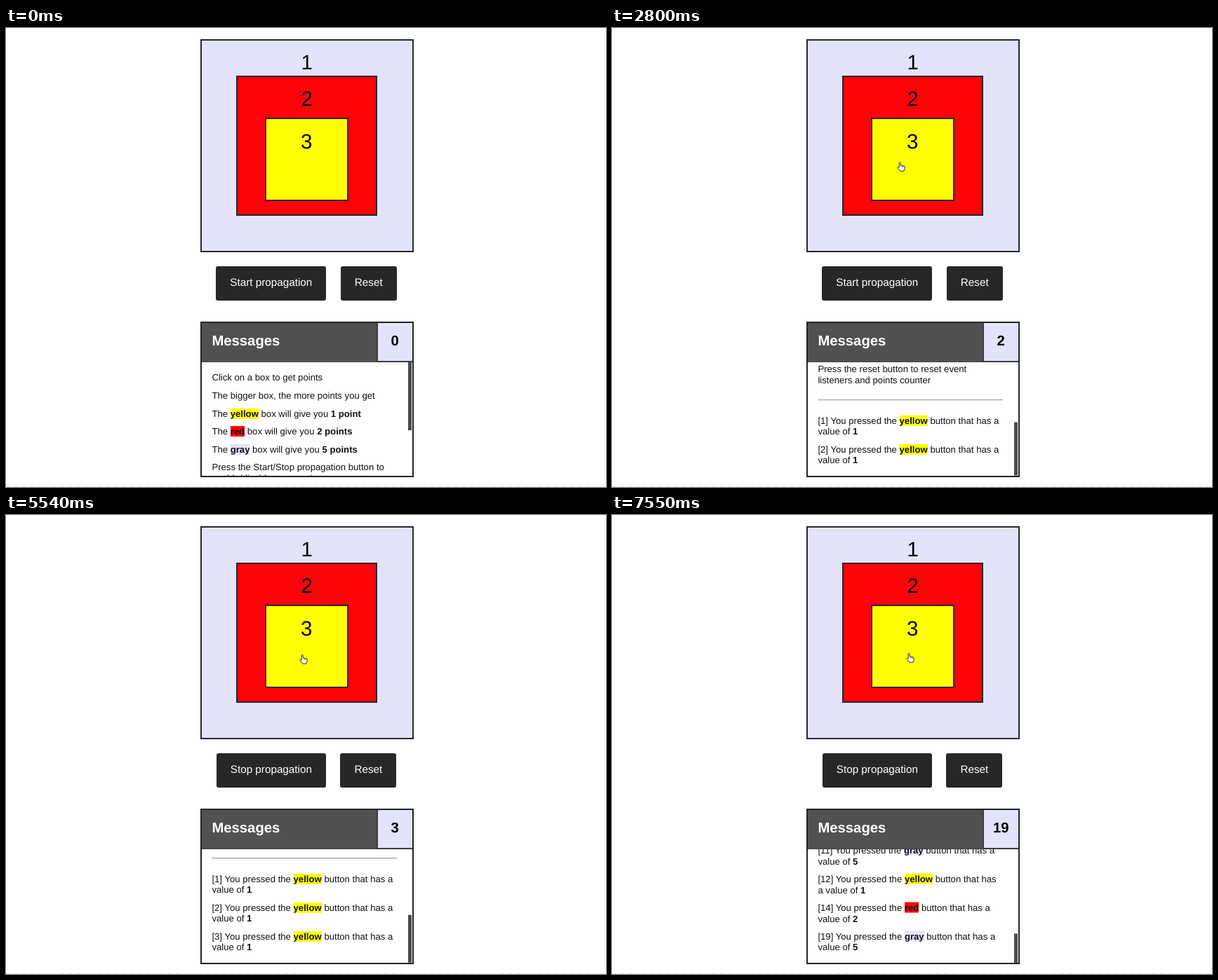
Write an HTML page that moves like this. It is 855 by 655 pixels and loops after 8 s.

```html
<!DOCTYPE html>
<html lang="en">
<head>
<meta charset="utf-8">
<title>Event propagation</title>
<style>
  html, body { margin: 0; width: 855px; height: 655px; overflow: hidden; background: #fff; }
  body {
    position: relative;
    font-family: "Liberation Sans", Arial, sans-serif;
    color: #111;
    text-rendering: geometricPrecision;
  }
  .abs, .box { position: absolute; box-sizing: border-box; }
  .box { border: 2px solid #272730; text-align: center; font-size: 29.5px; line-height: 34px; color: #000; }
  #outer { left: 277px; top: 16px; width: 303.5px; height: 304px; background: #e3e4fa; padding-top: 15px; }
  #middle { left: 328px; top: 68px; width: 201px; height: 200px; background: #fe0208; padding-top: 15px; }
  #inner { left: 369px; top: 128px; width: 118.5px; height: 119px; background: #ff0; padding-top: 16px; }

  #buttons { left: 0; top: 340px; width: 856px; display: flex; justify-content: center; gap: 20.3px; }
  #buttons div {
    height: 48.5px; padding: 0 20.1px; border-radius: 3px; background: #272729;
    color: #fff; font-size: 15.25px; line-height: 48px; white-space: nowrap;
  }

  #panel { left: 277px; top: 419px; width: 303.5px; height: 222px; border: 2px solid #222228; }
  #head {
    left: 279px; top: 421px; width: 250px; height: 56px; padding-left: 14.4px;
    background: #515151; border-bottom: 1px solid #47474a;
    color: #fff; font-weight: bold; font-size: 20.3px; line-height: 53px;
  }
  #count {
    left: 528px; top: 421px; width: 50.5px; height: 55.5px;
    background: #e3e4fa; border: solid #3c3c40; border-width: 0 0 2px 2px;
    text-align: center; font-weight: bold; font-size: 20.3px; line-height: 53px; color: #000;
  }
  #view { left: 279px; top: 477px; width: 299.5px; height: 162px; overflow: hidden; }
  #list {
    left: 14.4px; top: 14.45px; width: 263.5px;
    display: flex; flex-direction: column; font-size: 13.15px; line-height: 15.3px;
  }
  #list p { margin: 0 0 10.3px; flex: none; }
  #list hr {
    margin: 9.65px 0 21.15px; width: 263.5px; height: 2px; flex: none;
    box-sizing: border-box; border: solid #999; border-width: 1px 0; border-bottom-color: #ddd;
  }
  #thumb { left: 294px; top: 0; width: 5.2px; background: #4b4b4e; }
  .yellow { background: #ff0; }
  .red { background: #fe0208; }
  .gray { background: #e3e4fa; }

  #dashes { left: 0; top: 654px; width: 855px; height: 1px; background: repeating-linear-gradient(90deg, #e8e8e8 0 6px, #fff 6px 11px); }
  #hand { left: 0; top: 0; width: 12px; height: 14px; overflow: visible; }
</style>
</head>
<body>
  <div class="box" id="outer">1</div>
  <div class="box" id="middle">2</div>
  <div class="box" id="inner">3</div>

  <div class="abs" id="buttons"><div id="toggle">Start propagation</div><div>Reset</div></div>

  <div class="abs" id="panel"></div>
  <div class="abs" id="head">Messages</div>
  <div class="abs" id="count">0</div>
  <div class="abs" id="view">
    <div class="abs" id="list">
      <p>Click on a box to get points</p>
      <p>The bigger box, the more points you get</p>
      <p>The <b class="yellow">yellow</b> box will give you <b>1 point</b></p>
      <p>The <b class="red">red</b> box will give you <b>2 points</b></p>
      <p>The <b class="gray">gray</b> box will give you <b>5 points</b></p>
      <p>Press the Start/Stop propagation button to<br>enable/disable propagation</p>
      <p>Press the reset button to reset event<br>listeners and points counter</p>
      <hr>
    </div>
    <div class="abs" id="thumb"></div>
  </div>

  <div class="abs" id="dashes"></div>
  <svg class="abs" id="hand" viewBox="0 0 12 14">
    <path d="M3.2 8.2V1.6a1 1 0 0 1 2 0V5.2C6 4.6 7 5 7.1 5.5 8 5 8.9 5.4 9 6c1-.4 2.2 0 2.2 1v2.5L10 13.2H5L1 8.6C.6 7.6 1.8 7 2.4 7.5Z"
      fill="#fff" stroke="#111" stroke-width=".9" stroke-linejoin="round"/>
    <path d="M7.1 5.5v2.3M9 6v2" stroke="#111" stroke-width=".7"/>
  </svg>

<script>
const LOOP = 8000, TOGGLE = 4680;
const VIEW = 162, FIRST_SCROLL = 140.3, ROW = 40.9;
const POINTS = { yellow: 1, red: 2, gray: 5 };

// time of click, boxes that answer, scroll duration
const clicks = [
  [1130, ['yellow'], 300],
  [2460, ['yellow'], 300],
  [3610, ['yellow'], 240],
  [6010, ['yellow', 'red', 'gray'], 300],
  [7270, ['yellow', 'red', 'gray'], 300]
];

// time, centre x, centre y
const path = [
  [260, 579, 19], [330, 550, 85], [400, 488, 163], [467, 440, 188], [533, 416, 197], [600, 412, 198],
  [3883, 412, 198], [3950, 413, 212], [4017, 416, 243], [4083, 410, 290], [4150, 395, 330],
  [4217, 383, 352], [4290, 376, 360], [4350, 374, 362],
  [5083, 374, 362], [5150, 378, 352], [5217, 392, 326], [5283, 409, 294], [5350, 414, 242],
  [5417, 421, 219], [5483, 424, 208], [5610, 425, 204]
];

const $ = id => document.getElementById(id);
const clamp = x => Math.max(0, Math.min(1, x));
const smooth = x => (x = clamp(x), x * x * (3 - 2 * x));
const scrollEnd = n => n ? FIRST_SCROLL + ROW * (n - 1) : 0;

const rows = [];
let total = 0;
for (const [time, names] of clicks) {
  for (const name of names) {
    total += POINTS[name];
    const p = document.createElement('p');
    p.innerHTML = `[${total}] You pressed the <b class="${name}">${name}</b> button that has a value of <b>${POINTS[name]}</b>`;
    $('list').append(p);
    rows.push({ p, time, total });
  }
}

function handAt(t) {
  const i = path.findIndex(k => k[0] > t);
  if (i < 0) return path[path.length - 1].slice(1);
  const [t0, x0, y0] = path[Math.max(0, i - 1)], [t1, x1, y1] = path[i];
  const f = t1 > t0 ? clamp((t - t0) / (t1 - t0)) : 0;
  return [x0 + (x1 - x0) * f, y0 + (y1 - y0) * f];
}

function draw(t) {
  const q = Math.floor(t * 0.015 + 0.11) / 0.015; // motion runs at 15 steps a second

  let shown = 0, score = 0;
  for (const row of rows) {
    const on = t >= row.time;
    row.p.style.visibility = on ? 'visible' : 'hidden';
    if (on) { shown++; score = row.total; }
  }
  $('count').textContent = score;

  let scroll = 0, n = 0;
  for (const [time, names, span] of clicks) {
    const from = scrollEnd(n);
    n += names.length;
    if (t >= time) scroll = from + (scrollEnd(n) - from) * smooth((q - time + 35) / span);
  }
  $('list').style.transform = `translateY(${-scroll}px)`;

  const content = shown ? scrollEnd(shown) + VIEW : 270;
  $('thumb').style.height = VIEW * VIEW / content + 'px';
  $('thumb').style.transform = `translateY(${scroll * VIEW / content}px)`;

  $('toggle').textContent = (t < TOGGLE ? 'Start' : 'Stop') + ' propagation';
  const hover = smooth((q - 4140) / 200) - smooth((q - 5170) / 250);
  const shade = Math.round(39 + 36 * hover);
  $('toggle').style.background = `rgb(${shade},${shade},${shade + 2})`;

  const [x, y] = handAt(q);
  $('hand').style.visibility = t < 260 ? 'hidden' : 'visible';
  $('hand').style.transform = `translate(${Math.round(x) - 6}px,${Math.round(y) - 7}px)`;
}

const start = performance.now();
function tick() {
  draw((performance.now() - start) % LOOP);
  requestAnimationFrame(tick);
}
tick();
</script>
</body>
</html>
```
